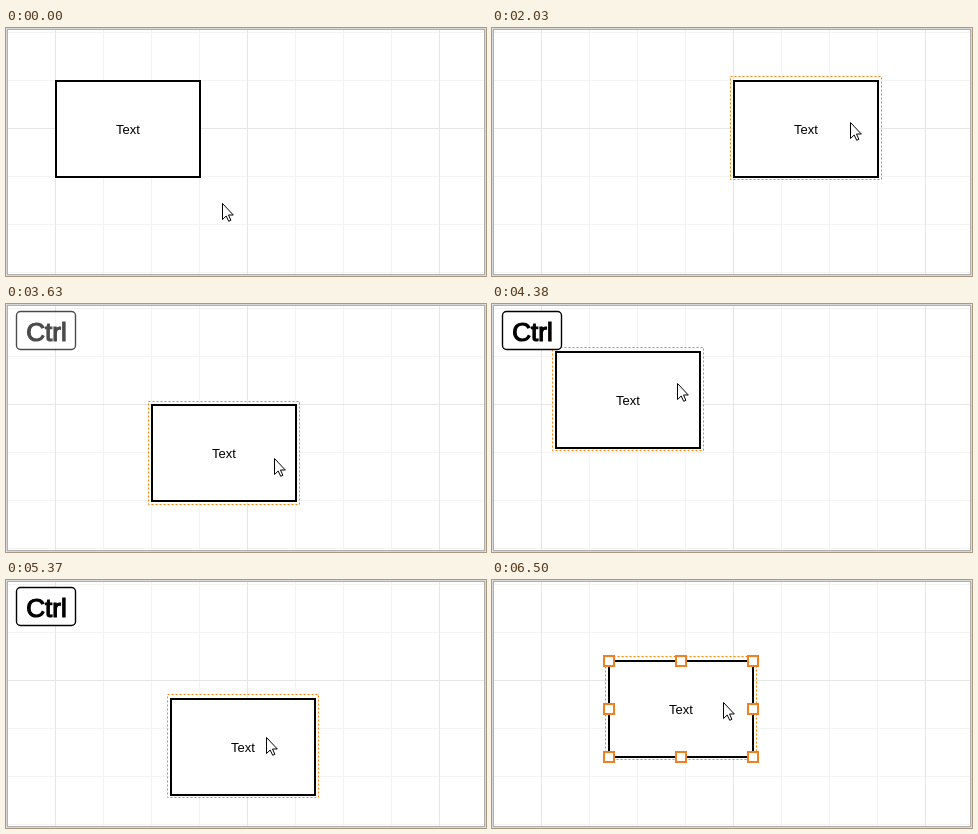
Recreate the animation shown at these times as an HTML page. Size 480 by 248 pixels, loop 6.53 s.

```html
<!DOCTYPE html>
<html lang="en">
<head>
<meta charset="utf-8">
<title>Dragging a shape</title>
<style>
  html, body { margin: 0; width: 100%; height: 100%; overflow: hidden; background: #fff; }
  svg { display: block; width: 480px; height: 248px; }
  text { font-family: "Liberation Sans", Arial, sans-serif; text-anchor: middle; }
</style>
</head>
<body>
<svg viewBox="0 0 480 248">
  <g id="grid"></g>
  <rect x="1.25" y="1.25" width="477.5" height="245.5" fill="none" stroke="#b0b0b0" stroke-width="1.5"/>
  <g id="shape">
    <rect width="144" height="96" fill="#fff" stroke="#000" stroke-width="2"/>
    <text x="72" y="53" font-size="13">Text</text>
  </g>
  <rect id="outline" width="151" height="103" fill="none" stroke="#ff8000" stroke-dasharray="2 2"/>
  <g id="handles" fill="#fff" stroke="#f08020" stroke-width="2"></g>
  <g id="key">
    <rect x="10.5" y="7.5" width="59" height="38" rx="4" fill="#fff" stroke="#000" stroke-width="1.4"/>
    <text x="40.5" y="37" font-size="26" stroke="#000" stroke-width="1.2">Ctrl</text>
  </g>
  <path id="cursor" d="M.5 .5V16.5L4.2 13L6.7 18.3L8.9 17.3L6.5 12H11.3Z" fill="#fff" stroke="#000"/>
</svg>
<script>
const LOOP = 6530, LAG = 60;
const PRESS = 900, DRAG = 1070, FREE = 3770, DROP = 6080;
const HOME = { x: 50, y: 52.7 }, STEP = { x: 48, y: 48.4 }, GRAB = { x: 115, y: 42 };

// Turning points [ms, position] of the pull on the shape, one swing between each two
const TURNS = {
  x: [[390, 102], [890, 50], [1020, 50], [2250, 252], [2665, 252], [3265, 155], [3660, 155],
      [4320, 62], [5100, 224], [5614, 115], [5850, 117]],
  y: [[390, 134], [890, 53], [2150, 53], [2960, 113], [3880, 113], [4666, 21], [5340, 119.2],
      [5850, 80.7]]
};

const $ = id => document.getElementById(id);
const place = (el, x, y) => el.setAttribute('transform', `translate(${x} ${y})`);
const show = (el, on) => el.setAttribute('visibility', on ? 'visible' : 'hidden');
const clamp = v => Math.min(1, Math.max(0, v));
const ease = u => (1 - Math.cos(Math.PI * clamp(u))) / 2;

function add(parent, tag, attrs) {
  const el = document.createElementNS('http://www.w3.org/2000/svg', tag);
  for (const k in attrs) el.setAttribute(k, attrs[k]);
  parent.appendChild(el);
}

function pull(axis, t) {
  return TURNS[axis].reduce(([t0, v0, sum], [t1, v1]) =>
    [t1, v1, sum + (v1 - v0) * ease((t - t0) / (t1 - t0))],
    [0, TURNS[axis][0][1], TURNS[axis][0][1]])[2];
}

function corner(axis, t) {
  const home = HOME[axis], step = STEP[axis];
  if (t < DRAG) return home;
  const v = pull(axis, t);
  return t < FREE ? home + step * Math.round((v - home) / step) : v;
}

// The pointer runs ahead of the shape it drags
const pointer = (axis, t) => Math.round(pull(axis, t + LAG) + GRAB[axis]) - 1;

// Light lines first, every fourth one strong
for (const strong of [false, true]) {
  const stroke = strong ? '#e6e6e6' : '#f3f3f3';
  for (let i = 0; i < 9; i++)
    if ((i % 4 === 0) === strong) add($('grid'), 'path', { d: `M${49.5 + 48 * i} 2V246`, stroke });
  for (let i = 0; i < 6; i++)
    if ((i % 4 === 2) === strong) add($('grid'), 'path', { d: `M2 ${4.5 + 48 * i}H478`, stroke });
}

for (let i = 0; i < 3; i++) for (let j = 0; j < 3; j++)
  if (i !== 1 || j !== 1)
    add($('handles'), 'rect', { x: i * 72 - 5, y: j * 48 - 5, width: 10, height: 10 });

function draw() {
  const t = performance.now() % LOOP;
  const x = Math.round(corner('x', t)), y = corner('y', t);

  place($('shape'), x, Math.round(y));
  place($('handles'), x, Math.round(y));
  place($('outline'), x - 3.5, Math.floor(y) - 3.5);
  place($('cursor'), pointer('x', t), pointer('y', t));

  show($('outline'), t >= PRESS);
  show($('handles'), t >= PRESS && t < DRAG || t >= DROP);
  $('key').setAttribute('opacity', clamp((t - 3420) / 300) * clamp((6430 - t) / 320));
  requestAnimationFrame(draw);
}
draw();
</script>
</body>
</html>
```
